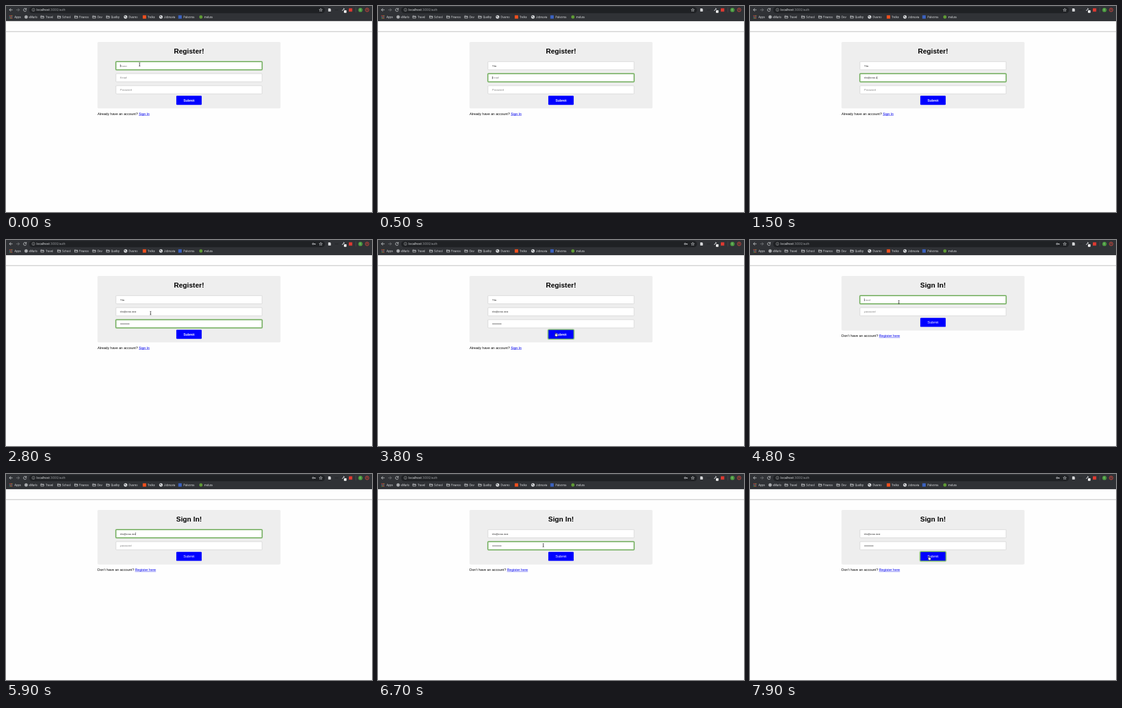
An HTML page with a canvas for the animation above (8 s loop, 600 by 338 pixels).

```html
<!DOCTYPE html>
<html lang="en">
<head>
<meta charset="utf-8">
<title>Register and sign in</title>
<style>
  html, body { margin: 0; height: 100%; overflow: hidden; }
  canvas { display: block; }
</style>
</head>
<body>
<canvas id="stage" width="600" height="338"></canvas>
<script>
const ctx = document.getElementById('stage').getContext('2d');
const LOOP = 8000, STEP = 100;
const ARIAL = '"Liberation Sans", Arial, sans-serif', UI = 'Inter, Roboto, sans-serif';
const EMAIL = 'tilo@emo.test', ROWS = [98, 117.7, 137.5];

// Mouse path: time, x, y. The pointer is hidden while typing.
const PATHS = [
  [[0, 219, 96], [99, 219, 96]],
  [[2600, 219, 96], [2800, 237, 120], [3200, 292, 155], [4200, 292, 155], [4700, 244, 102], [4950, 244, 102]],
  [[6600, 262, 112], [6700, 271, 117], [7100, 294, 138], [LOOP, 294, 138]]
];

// Drawn large and scaled down so that small glyphs keep exact spacing.
function text(str, x, y, size, color, { font = ARIAL, weight = 400, align = 'left' } = {}) {
  ctx.save();
  ctx.translate(x, y);
  ctx.scale(.1, .1);
  ctx.font = `${weight} ${size * 10}px ${font}`;
  ctx.textAlign = align;
  ctx.fillStyle = color;
  ctx.fillText(str, 0, 0);
  const width = ctx.measureText(str).width / 10;
  ctx.restore();
  return width;
}

function box(x, y, w, h, r, fill, stroke, line = .5) {
  ctx.beginPath();
  ctx.roundRect(x, y, w, h, r);
  paint(fill, stroke, line);
}

function circle(x, y, r, fill, stroke, line = .7) {
  ctx.beginPath();
  ctx.arc(x, y, r, 0, 7);
  paint(fill, stroke, line);
}

function paint(fill, stroke, line) {
  if (fill) { ctx.fillStyle = fill; ctx.fill(); }
  if (stroke) { ctx.strokeStyle = stroke; ctx.lineWidth = line; ctx.stroke(); }
}

function path(d, x, y, stroke, line = .8, fill) {
  ctx.save();
  ctx.translate(x, y);
  const p = new Path2D(d);
  if (fill) { ctx.fillStyle = fill; ctx.fill(p); }
  if (stroke) { ctx.strokeStyle = stroke; ctx.lineWidth = line; ctx.stroke(p); }
  ctx.restore();
}

const icons = {
  apps(x) {
    ['#e8574a', '#e8574a', '#e0b040', '#4a86d8', '#e8574a', '#4a86d8', '#5aa860', '#e0b040', '#e8574a']
      .forEach((c, i) => box(x - 2.4 + i % 3 * 1.8, 15.6 + Math.floor(i / 3) * 1.8, 1.2, 1.2, 0, c));
  },
  folder(x) { path('M-2.5-1.9H-.5L.2-1.2H2.5V1.9H-2.5ZM-2.5-.4H2.5', x, 18, '#d5d7da', .7); },
  globe(x) {
    circle(x, 18, 2.8, '#e4e6e8');
    path('M-2-.9L-.2-1.5L.4-.3L-.9.4ZM.3.6L1.8.2L.8 1.8Z', x, 18, null, 0, '#3b3d40');
  },
  square: (x, c) => box(x - 2.8, 15.2, 5.6, 5.6, .4, c),
  dot: (x, c) => circle(x, 18, 2.7, c)
};

const BOOKMARKS = [
  ['Apps', 14, 'apps', 8], ['eMurlo', 37.5, 'dot', 33, '#a9abae'],
  ['Travel', 65, 'folder', 59.5], ['School', 92, 'folder', 87], ['Finance', 120, 'folder', 115],
  ['Dev', 150, 'folder', 144.5], ['Quolby', 172, 'folder', 167], ['Ovarno', 201, 'globe', 196],
  ['Trelko', 232, 'square', 227, '#f0501e'], ['Jobnuvia', 259, 'globe', 254],
  ['Palvorna', 291, 'square', 285.3, '#3b62c0'], ['melura', 325, 'dot', 319.5, '#5f9a35']
];

function drawBrowser(t) {
  const pale = '#d9dbde';
  box(0, 0, 600, 24.7, 0, '#303236');
  box(38, 1.4, 485, 10.4, 5.2, '#1f2124');
  path('M2.7 0H-2.3M0-2.5L-2.5 0L0 2.5', 8, 6.3, pale);
  path('M-2.7 0H2.3M0-2.5L2.5 0L0 2.5', 19.5, 6.3, '#85878a');
  path('M1.7-1.6A2.4 2.4 0 1 0 2.4.5M2.3-2.8V-.8H.3', 31, 6.3, pale);
  circle(45, 6.3, 2.4, null, '#a9abae', .6);
  box(44.7, 5.9, .6, 1.8, 0, '#a9abae');
  box(44.7, 4.8, .6, .6, 0, '#a9abae');
  const w = text('localhost', 50, 8.2, 5, '#eceef0', { font: UI });
  text(':3000/auth', 50 + w, 8.2, 5, '#9a9da1', { font: UI });

  if (t >= 2000) {
    circle(503.4, 6.4, 1.2, null, pale, .9);
    path('M0 0H3M2 0V1.3', 504.6, 6.4, pale, .9);
  }
  path('M0-2.7L.7-.8L2.6-.8L1.1.4L1.7 2.3L0 1.2L-1.7 2.3L-1.1.4L-2.6-.8L-.7-.8Z', 516, 6.5, pale, .6);
  path('M-2-2.6H1L2.2-1.4V2.6H-2Z', 530.3, 6.5, null, 0, '#e6e7e9');
  path('M-1.2-.6H1.2M-1.2.6H1.2', 530.3, 6.7, '#8d8f92', .4);
  for (let i = -1; i < 2; i++) circle(542 + i * 1.9, 6.5, .6, '#1b1c1e');
  path('M-2 2L1.2-1.2M.2-2.2L2.2-.2', 553, 5.8, '#c9cbce', 1.1);
  box(554, 7, 4.2, 4.2, .6, '#f4f4f4');
  box(562, 3.7, 5.6, 5.6, .5, '#dd3a31');
  box(573, 2.6, .5, 8, 0, '#57595d');
  circle(581, 6.4, 3.5, '#4a9a3f');
  text('t', 581, 7.9, 4, '#e8f2e6', { font: UI, align: 'center' });
  circle(592, 6.4, 2.9, '#303236', '#e0493e', .9);
  path('M0 1.5V-1.4M-1.1-.3L0-1.4L1.1-.3', 592, 6.4, '#e0493e', .7);

  for (const [label, x, icon, iconX, color] of BOOKMARKS) {
    icons[icon](iconX, color);
    text(label, x, 19.6, 4.25, '#e4e6e9', { font: UI });
  }
}

// Part of a string typed so far, one key every `pace` ms.
const typed = (str, t, start, pace) =>
  t < start ? '' : str.slice(0, Math.floor((t - start) / pace) + 1);

function pageState(t) {
  if (t < 4100) return {
    title: 'Register!', ask: 'Already have an account? ', link: 'Sign In', bottom: 168, weight: 700, size: 5.35,
    labels: ['Name', 'Email', 'Password'],
    values: [typed('Tilo', t, 100, 100), typed(EMAIL, t, 700, 85), typed('********', t, 2000, 80)],
    focus: t < 500 ? 0 : t < 1900 ? 1 : t < 3400 ? 2 : 3
  };
  return {
    title: 'Sign In!', ask: "Don't have an account? ", link: 'Register here', bottom: 148.4, weight: 400, size: 5.75,
    labels: ['email', 'password'],
    values: [typed(EMAIL, t, 5000, 80), typed('********', t, 6100, 60)],
    focus: t < 4700 ? -1 : t < 6000 ? 0 : t < 7300 ? 1 : 2
  };
}

function drawField(y, label, value, focused, caret) {
  box(180.2, y - 6.7, 239.6, 13.4, 1, '#fff', '#c6c6c6', .6);
  if (focused) {
    box(180, y - 6.9, 240, 13.8, 1, null, 'rgba(120,185,95,.45)', 2.2);
    box(180.2, y - 6.7, 239.6, 13.4, .8, null, '#5da247', 1);
  }
  let width = 0;
  if (value[0] === '*') {
    width = value.length * 1.9;
    for (let i = 0; i < value.length; i++) circle(188.2 + i * 1.9, y + .2, .65, '#222');
  } else if (value) {
    width = text(value, 187.3, y + 1.5, 4.28, '#222');
  } else {
    text(label, 187.3, y + 1.5, 4.28, '#777');
  }
  if (focused && caret) box(187.3 + width, y - 2.3, .5, 4.6, 0, '#111');
}

function drawPage(page, caret) {
  box(0, 24.7, 600, 314, 0, '#fefefe');
  box(0, 41.6, 600, .8, 0, '#bcbcbc');
  box(150, 59, 300, page.bottom - 59, 1.8, '#eee');
  text(page.title, 300, 77.8, 11.43, '#000', { weight: 700, align: 'center' });
  page.labels.forEach((label, i) => drawField(ROWS[i], label, page.values[i], page.focus === i, caret));

  const top = page.bottom - 20.7;
  if (page.focus === page.labels.length) {
    box(278.6, top - .5, 42.8, 15.9, 1.8, null, 'rgba(140,200,120,.6)', 2.2);
  }
  box(279.2, top, 41.6, 14.9, 1.2, '#00f');
  if (page.focus === page.labels.length) box(279, top - .1, 42, 15.1, 1.4, null, '#66a857', .9);
  text('Submit', 300, top + 9.5, page.size, '#fff', { weight: page.weight, align: 'center' });

  const y = page.bottom + 10.7;
  const x = 150 + text(page.ask, 150, y, 5.715, '#000');
  const w = text(page.link, x, y, 5.715, '#00e');
  box(x, y + .6, w, .45, 0, '#00e');
}

function mouseAt(t) {
  const keys = PATHS.find(p => t >= p[0][0] && t < p[p.length - 1][0]);
  if (!keys) return null;
  const i = keys.findIndex(k => k[0] > t);
  const [t0, x0, y0] = keys[i - 1], [t1, x1, y1] = keys[i];
  const k = (t - t0) / (t1 - t0);
  return [x0 + (x1 - x0) * k, y0 + (y1 - y0) * k];
}

function drawMouse([x, y], page) {
  const top = page.bottom - 20.7;
  const overButton = x > 279 && x < 321 && y > top && y < top + 15;
  const overField = x > 180 && x < 420 && page.labels.some((_, i) => Math.abs(y - ROWS[i]) < 7);
  if (overButton) {
    path('M-1.3-2.8Q-.8-3.4-.3-2.8L.1-.8L2-.3Q2.8 0 2.6 1L2 3.2H-.9L-2.4.9Q-2.3 0-1-.2Z', x, y, '#111', .6, '#fff');
  } else if (overField) {
    path('M-1.2-2.8Q0-2.8 0-2V2Q0 2.8-1.2 2.8M1.2-2.8Q0-2.8 0-2M0 2Q0 2.8 1.2 2.8M-.6.8H.6', x, y, '#222', .7);
  } else {
    path('M0-3V3L1.4 1.7L2.4 3.8L3.2 3.4L2.3 1.4H4.2Z', x - 1, y, '#fff', .5, '#111');
  }
}

function frame(now) {
  const t = Math.floor(now % LOOP / STEP) * STEP;
  const page = pageState(t), mouse = mouseAt(t);
  const caret = !mouse || t < 100 || (t >= 4700 && t < 5000);
  drawPage(page, caret);
  drawBrowser(t);
  if (mouse) drawMouse(mouse, page);
  requestAnimationFrame(frame);
}
requestAnimationFrame(frame);
</script>
</body>
</html>
```
